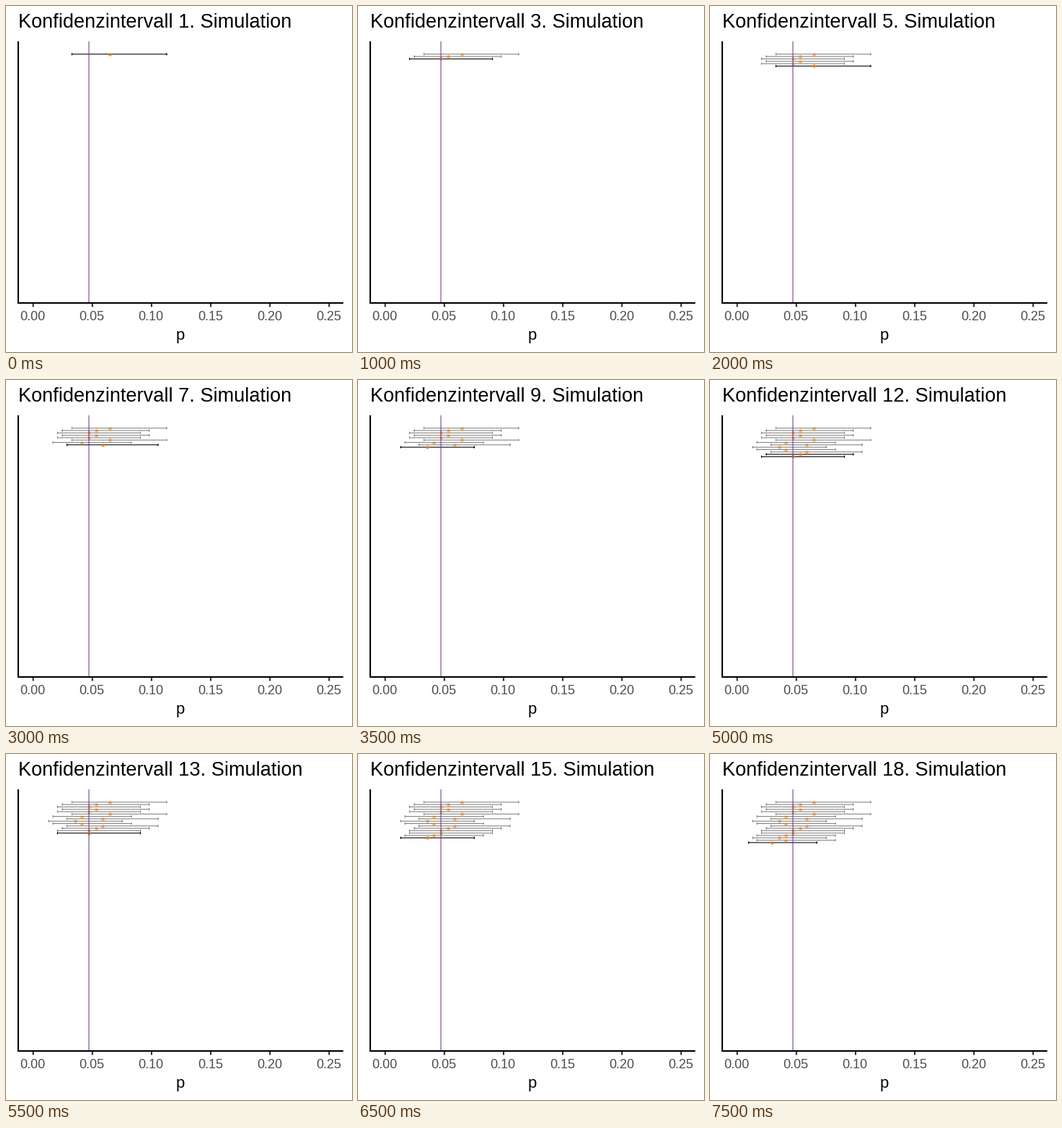
A matplotlib script for the animation above (8 s loop, 480 by 480 pixels).

```python
import math

import matplotlib.pyplot as plt
from matplotlib.animation import FuncAnimation

SIZE, DPI = 480, 72
FRAMES, INTERVAL = 16, 500
N = 170                       # sample size of every simulation
HITS = [11, 9, 8, 9, 8, 11, 7, 10, 6, 7, 10, 9, 8, 8, 7, 6, 7, 5]
STEP = 99 / 86                # simulations per animation step
TOP, GAP = 66.8, 3.3          # first row and row distance in pixels
LEFT, RIGHT, UPPER, LOWER = 17, 468, 49, 412

plt.rcParams["font.family"] = "Liberation Sans"


def px(p):
    return 37.7 + p * 1642.4


def cdf(k, p):
    return sum(math.comb(N, i) * p**i * (1 - p) ** (N - i) for i in range(k + 1))


def solve(k, target):
    """Find p with cdf(k, p) == target by bisection."""
    lo, hi = 0.0, 0.5
    for _ in range(40):
        mid = (lo + hi) / 2
        if cdf(k, mid) > target:
            lo = mid
        else:
            hi = mid
    return lo


def interval(k):
    """Exact 95 % confidence interval for k hits."""
    return solve(k - 1, 0.975), solve(k, 0.025)


fig = plt.figure(figsize=(SIZE / DPI, SIZE / DPI), dpi=DPI, facecolor="white")
ax = fig.add_axes([0, 0, 1, 1])
ax.set_xlim(0, SIZE)
ax.set_ylim(SIZE, 0)
ax.axis("off")


def line(xs, ys, color="black", lw=1.07, **kw):
    return ax.plot(xs, ys, color=color, lw=lw, solid_capstyle="butt",
                   snap=False, **kw)[0]


# Axes and labels
line([LEFT, LEFT], [UPPER, LOWER + 1], lw=2.13)
line([LEFT - 1, RIGHT], [LOWER, LOWER], lw=2.13)
for i in range(6):
    x = px(i * 0.05)
    line([x, x], [LOWER + 1, LOWER + 5.5], "#333333", 2.13)
    ax.text(x - 0.7, 436, f"{i * 0.05:.2f}", size=18, color="#4d4d4d",
            ha="center")
ax.text((LEFT + RIGHT) / 2 - 1, 463, "p", size=22, ha="center")
title = ax.text(LEFT, 30, "", size=27.1)

# True proportion
line([px(8 / N)] * 2, [UPPER, LOWER - 1], "#6b2c91", 1.25, alpha=0.8, zorder=5)

# One error bar and one point per simulation
rows = []
for i, k in enumerate(HITS):
    lo, hi = map(px, interval(k))
    y = TOP + i * GAP
    up, down = y - GAP / 2, y + GAP / 2
    bar = line([lo, lo, math.nan, lo, hi, math.nan, hi, hi],
               [up, down, math.nan, y, y, math.nan, up, down], zorder=3)
    dot = ax.plot([px(k / N)], [y], "o", color="#f57c00", ms=4.5, mew=0,
                  zorder=4, snap=False)[0]
    rows.append((round(i / STEP), bar, dot))


def update(frame):
    title.set_text(f"Konfidenzintervall {int(1 + frame * STEP)}. Simulation")
    for start, bar, dot in rows:
        current = start == frame
        bar.set_visible(start <= frame)
        dot.set_visible(start <= frame)
        bar.set_alpha(1 if current else 0.5)
        dot.set_alpha(0.85 if current else 0.6)
    return []


anim = FuncAnimation(fig, update, frames=FRAMES, interval=INTERVAL,
                     repeat=True, repeat_delay=0)
plt.show()
```
